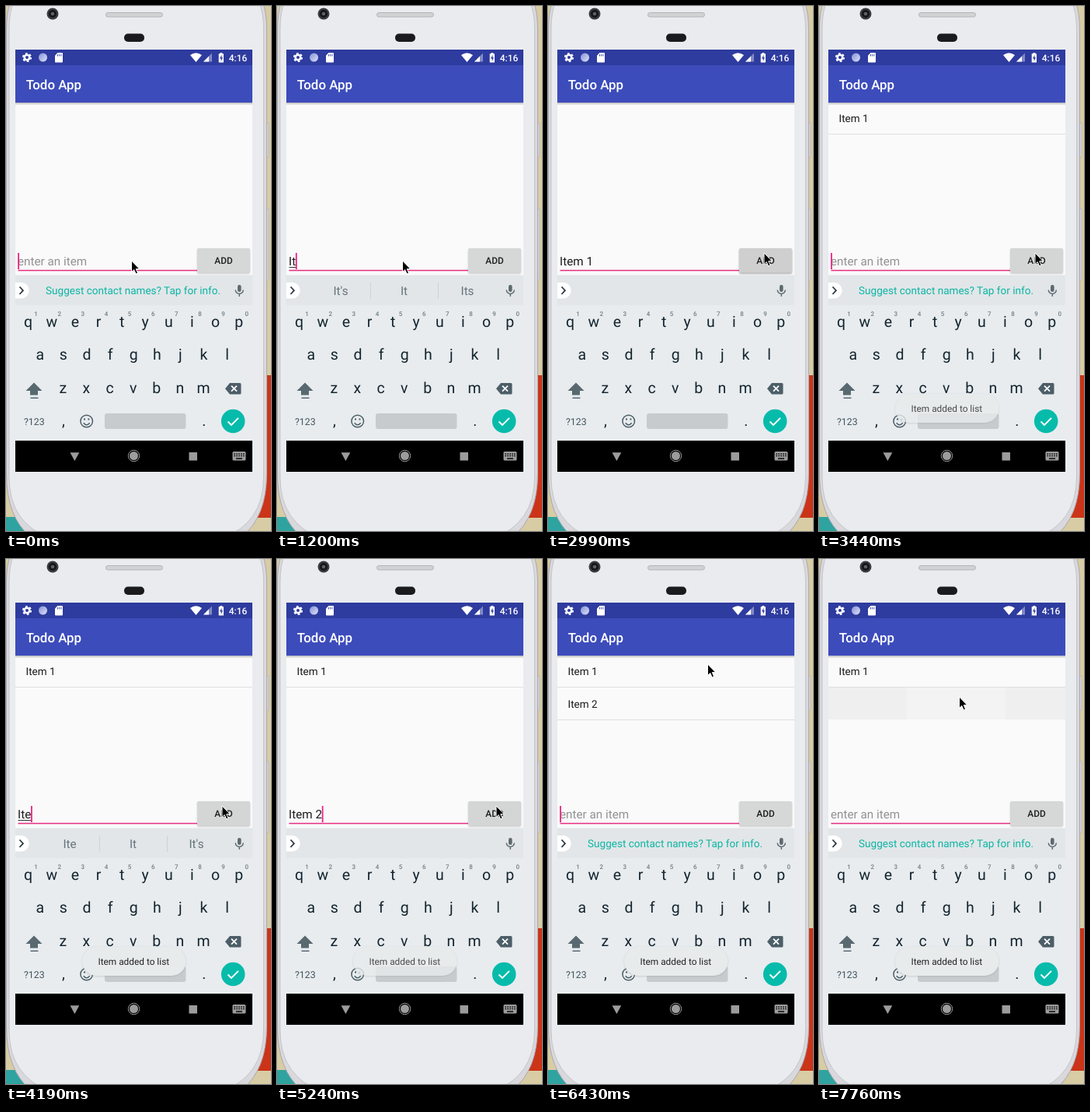
Animation of 341 by 674 pixels, one loop 8 s. Source, as an HTML page:

```html
<!DOCTYPE html>
<html lang="en">
<head>
<meta charset="utf-8">
<title>Todo App</title>
<style>
html, body { margin: 0; width: 100%; height: 100%; overflow: hidden; background: #d8cca4; }
svg { display: block; width: 341px; height: 674px; }
text { font-family: Roboto, "Open Sans", sans-serif; white-space: pre; text-rendering: geometricPrecision; }
.mid { text-anchor: middle; }
.key { font-size: 19.5px; fill: #14252f; text-anchor: middle; }
.num { font-size: 8px; fill: #727e84; font-weight: 500; text-anchor: middle; }
.item { font-size: 13.56px; fill: #1b1b1b; }
.field { font-size: 15.25px; }
.word { font-size: 15.25px; fill: #66747b; text-anchor: middle; }
</style>
</head>
<body>
<svg viewBox="0 0 341 674">
  <defs>
    <linearGradient id="shade" x2="0" y2="1">
      <stop stop-color="#000" stop-opacity=".26"/><stop offset="1" stop-color="#000" stop-opacity="0"/>
    </linearGradient>
    <linearGradient id="ball" x2="1" y2="1">
      <stop stop-color="#8290d8"/><stop offset="1" stop-color="#dfe3f8"/>
    </linearGradient>
    <filter id="soft" x="-20%" y="-40%" width="140%" height="180%"><feGaussianBlur stdDeviation="1.2"/></filter>
  </defs>

  <!-- backdrop and phone -->
  <rect width="341" height="674" fill="#d8cca4"/>
  <rect x="280" y="474" width="61" height="183" fill="#cb3418"/>
  <rect y="656" width="40" height="18" fill="#2fa3a0"/>
  <rect x="334" y="150" width="4" height="44" rx="1.5" fill="#d6d5da" stroke="#a9a8ad" stroke-width=".6"/>
  <rect x="334" y="260" width="4" height="92" rx="1.5" fill="#d6d5da" stroke="#a9a8ad" stroke-width=".6"/>
  <path d="M6-6Q.5 8 .5 30V600Q.5 656 32 682H303Q335.500 656 335.500 600V30Q335.500 8 330-6Z" fill="#d9d8dd" stroke="#aaa8af"/>
  <path d="M10-6Q4 8 4 30V605Q4 664 58 684H277Q331.500 664 331.500 605V30Q331.500 8 325-6Z" fill="#e9ebee" stroke="#bcbbc1" stroke-width=".8"/>
  <circle cx="60" cy="10" r="7.500" fill="#3b3b3d"/>
  <circle cx="60" cy="10" r="5" fill="#161618"/>
  <circle cx="60" cy="10" r="2.300" fill="#5d6064"/>
  <rect x="128.500" y="8.500" width="73" height="5.500" rx="2.700" fill="#d0d2d4" stroke="#b3b5b8"/>
  <rect x="152" y="35.500" width="26" height="10.500" rx="5" fill="#1b1b1d"/>

  <!-- screen -->
  <rect x="12" y="56" width="305" height="542" fill="#fafafa"/>
  <rect x="12" y="56" width="305" height="20.500" fill="#2e3b9f"/>
  <rect x="12" y="76" width="305" height="48" fill="#3c4cbb"/>
  <rect x="12" y="124" width="305" height="3.500" fill="url(#shade)"/>
  <text x="25.700" y="106.500" font-size="16.900" font-weight="500" fill="#fff">Todo App</text>
  <g fill="#fff">
    <circle cx="27" cy="66" r="3.300" fill="none" stroke="#fff" stroke-width="2.600"/>
    <circle cx="27" cy="66" r="5.200" fill="none" stroke="#fff" stroke-width="1.800" stroke-dasharray="2.700 2.745"/>
    <circle cx="47.500" cy="66" r="5.500" fill="url(#ball)"/>
    <path d="M66.500 60H72a1 1 0 0 1 1 1V71.500a1 1 0 0 1-1 1H64a1 1 0 0 1-1-1V63.500Z"/>
    <path d="M66.500 62v2.500M68.700 62v2.500M70.900 62v2.500" stroke="#2e3b9f" stroke-width=".9"/>
    <path d="M237 63Q244.500 57.500 252 63L244.500 72Z"/>
    <path d="M265 60.500V71.500H254Z" opacity=".4"/>
    <path d="M261 64.500V71.500H254Z"/>
    <path d="M275.500 60h2.800v1.200H280V72.500H273.700V61.200h1.800Z"/>
    <path d="M277.500 62.800L275 67.500H276.700V71L279 66.300H277.500Z" fill="#2e3b9f"/>
  </g>
  <text x="298.500" y="70.500" class="mid" font-size="12" font-weight="500" fill="#fff">4:16</text>

  <!-- list -->
  <g id="row1"><text class="item" x="25.500" y="149">Item 1</text><path d="M12 164.500H317" stroke="#dfdfdf"/></g>
  <g id="row2"><text class="item" x="25.500" y="190.500">Item 2</text><path d="M12 206.500H317" stroke="#dfdfdf"/></g>
  <g id="press">
    <rect x="12" y="165" width="305" height="41" fill="#efefef"/>
    <rect x="113" y="165" width="127" height="41" fill="#f3f3f3"/>
    <rect id="spot" x="149" y="166" width="59" height="40" fill="#f6f6f6"/>
  </g>

  <!-- input -->
  <path d="M15.500 339.500H246" stroke="#e52c80" stroke-width="1.700"/>
  <text id="hint" class="field" x="15" y="333" fill="#929292">enter an item</text>
  <text id="typed" class="field" x="15" y="333" fill="#1b1b1b"></text>
  <path id="under" stroke="#333"/>
  <rect id="caret" y="317" width="1.800" height="21" fill="#ec2482"/>
  <rect id="glow" x="246" y="312" width="68" height="32" rx="2" filter="url(#soft)"/>
  <rect id="button" x="246" y="311" width="68" height="31.500" rx="2"/>
  <text x="280" y="331" class="mid" font-size="11.860" font-weight="500" fill="#1d1d1d">ADD</text>

  <!-- keyboard -->
  <rect x="12" y="345.500" width="305" height="38.500" fill="#e2e6e8"/>
  <rect x="12" y="384" width="305" height="174" fill="#e8ecef"/>
  <path d="M12 355H19.500a10 10 0 0 1 0 20.500H12Z" fill="#fff"/>
  <path d="M17.500 360.500L22 365.200L17.500 370" fill="none" stroke="#26333a" stroke-width="1.700"/>
  <text id="offer" x="163.500" y="370" class="mid" font-size="13.560" fill="#0cb5a5">Suggest contact names? Tap for info.</text>
  <g id="words">
    <path d="M120.500 355V376M207.500 355V376" stroke="#cdd3d6"/>
    <text class="word" x="82" y="371"></text>
    <text class="word" x="163.500" y="371"></text>
    <text class="word" x="245" y="371"></text>
  </g>
  <g stroke="#5d6a70" fill="none" stroke-width="1.500">
    <rect x="298" y="358" width="4.600" height="9" rx="2.300" fill="#5d6a70" stroke="none"/>
    <path d="M295.300 364.500a5 5 0 0 0 10 0M300.300 369.500V373"/>
  </g>
  <g id="keys"></g>
  <path d="M36 483.500L46.500 494H41V499.500H31V494H25.500ZM31.500 502.500H41.500V504H31.500Z" fill="#586970"/>
  <path d="M288 484H301a1.500 1.500 0 0 1 1.500 1.500V497a1.500 1.500 0 0 1-1.500 1.500H288L282 491.200Z" fill="#4c5e67"/>
  <path d="M290 487.700L297 494.700M297 487.700L290 494.700" stroke="#fff" stroke-width="1.700"/>
  <text x="36.300" y="537.500" class="mid" font-size="12.300" fill="#41535c">?123</text>
  <g fill="none" stroke="#4c5e67" stroke-width="1.500">
    <circle cx="103.700" cy="533" r="7.800"/>
    <path d="M99.700 535.300Q103.700 540.300 107.700 535.300"/>
    <path d="M101 529.500v2M106.400 529.500v2" stroke-width="2"/>
  </g>
  <rect x="127" y="523" width="104.500" height="20" rx="3" fill="#c7cbcd"/>
  <circle cx="292.200" cy="533" r="15.300" fill="#07bbab"/>
  <path d="M285.500 533.500L290 538L299 528.800" fill="none" stroke="#fff" stroke-width="1.900"/>

  <!-- navigation bar -->
  <rect x="12" y="558" width="305" height="40" fill="#000"/>
  <g fill="#9c9c9c">
    <path d="M82.500 573.200H94.300L88.400 584Z"/>
    <circle cx="164.500" cy="577.500" r="5.500"/>
    <circle cx="164.500" cy="577.500" r="7.200" fill="none" stroke="#9c9c9c"/>
    <rect x="235.500" y="573" width="10.500" height="10.500"/>
    <rect x="291.500" y="572" width="17" height="11.500" rx="1.500"/>
    <path d="M293.500 574.900H307M293.500 577.600H307" stroke="#000" stroke-width="1.500" stroke-dasharray="1.500 1.400"/>
    <path d="M296 581H304" stroke="#000" stroke-width="1.400"/>
  </g>

  <g id="toast">
    <rect x="98" y="498.500" width="133.500" height="37.500" rx="18.700" fill="#8d9599" opacity=".35" filter="url(#soft)"/>
    <rect x="98" y="498" width="133.500" height="37" rx="18.500" fill="#e8ebec"/>
    <text x="164.300" y="521" class="mid" font-size="11.860" fill="#222">Item added to list</text>
  </g>
  <path id="pointer" d="M0 0V14.500L3.300 11.500L5.600 16.800L8 15.800L5.800 10.600H10.300Z" fill="#000" stroke="#fff"/>
</svg>
<script>
const LOOP = 8000;
const $ = id => document.getElementById(id);

function addKey(x, y, label, cls) {
  const t = document.createElementNS("http://www.w3.org/2000/svg", "text");
  t.setAttribute("class", cls);
  t.setAttribute("x", x);
  t.setAttribute("y", y);
  t.textContent = label;
  $("keys").append(t);
}
const rows = [["qwertyuiop", 28.6, 411.5], ["asdfghjkl", 43.7, 454], ["zxcvbnm", 73.3, 497]];
for (const [letters, x, y] of rows)
  [...letters].forEach((c, i) => addKey(x + i * 30.12, y, c, "key"));
[..."1234567890"].forEach((c, i) => addKey(38.6 + i * 30.12, 397.5, c, "num"));
addKey(74, 538.5, ",", "key");
addKey(254.8, 538.5, ".", "key");

// Each track lists [start time, value]; a value holds until the next start.
const OFFER = null, NONE = [];
const AFTER_I = ["I'm", "I", "I'll"], AFTER_IT = ["It's", "It", "Its"];
const AFTER_ITE = ["Ite", "It", "It's"], AFTER_ITEM = ["Items", "Item", "Item's"];
const AFTER_WORD = ["I", "is", "and"];

const tracks = {
  text: [[0, ""], [750, "I"], [1200, "It"], [1350, "Ite"], [1500, "Item"], [1800, "Item "], [2100, "Item 1"],
    [3140, ""], [3590, "I"], [4040, "It"], [4190, "Ite"], [4340, "Item"], [4640, "Item "], [4940, "Item 2"], [5840, ""]],
  words: [[0, OFFER], [1200, AFTER_IT], [1350, AFTER_ITE], [1500, AFTER_ITEM], [1800, AFTER_WORD], [2100, NONE],
    [3140, OFFER], [3890, AFTER_I], [4040, AFTER_IT], [4190, AFTER_ITE], [4340, AFTER_ITEM], [4640, AFTER_WORD],
    [4940, NONE], [5840, OFFER]],
  caret: [[0, 1], [450, 0], [750, 1], [2550, 0], [3140, 1], [5390, 0], [5840, 1], [6730, 0], [7020, 1], [7470, 0]],
  down: [[0, 0], [2990, 1], [3290, 0], [5690, 1], [5990, 0]],
  hover: [[0, 0], [2850, 1], [5990, 0]],
  items: [[0, 0], [3140, 1], [5840, 2], [7470, 1]],
  press: [[0, 0], [7470, 1]],
  spot: [[0, 1], [7760, 0]],
  toast: [[0, 0], [3290, .35], [3440, .8], [3590, 1], [5240, .8], [5390, 0], [5990, .25], [6140, .65], [6290, .9], [6430, 1]],
  pointer: [[0, [161.5, 327]], [2400, [185, 326]], [2550, [228, 322]], [2700, [264, 318]], [2850, [278, 317]],
    [5240, [282, 317]], [5990, [322, 285]], [6140, [290, 205]], [6290, [243, 150]], [6430, [205.5, 135]],
    [6580, [200, 147]], [6730, [191, 163]], [6880, [183, 174]], [7020, [180.5, 177]]]
};

function at(name, t) {
  let value;
  for (const [start, v] of tracks[name]) {
    if (start > t) break;
    value = v;
  }
  return value;
}
const show = (id, on) => $(id).setAttribute("opacity", Number(on));
const wordCells = document.querySelectorAll(".word");

function draw(t) {
  const text = at("text", t), words = at("words", t), items = at("items", t);
  const down = at("down", t), typed = $("typed");
  if (typed.textContent !== text) typed.textContent = text;
  const end = 15 + (text ? typed.getComputedTextLength() : 0);
  show("hint", !text);
  $("caret").setAttribute("x", end + (text ? -.2 : .2));
  show("caret", at("caret", t));
  $("under").setAttribute("d", `M15.500 335.500H${end}`);
  show("under", text && !text.includes(" "));

  show("offer", words === OFFER);
  show("words", words && words.length);
  wordCells.forEach((cell, i) => cell.textContent = words?.[i] ?? "");

  show("row1", items > 0);
  show("row2", items > 1);
  show("press", at("press", t));
  show("spot", at("spot", t));
  $("button").setAttribute("fill", down ? "#cfcfcf" : at("hover", t) ? "#d4d5d5" : "#d6d7d7");
  $("glow").setAttribute("opacity", down ? .3 : .18);
  show("toast", at("toast", t));
  $("pointer").setAttribute("transform", `translate(${at("pointer", t)})`);
}

const begin = performance.now();
function tick() {
  draw((performance.now() - begin) % LOOP);
  requestAnimationFrame(tick);
}
tick();
</script>
</body>
</html>
```
